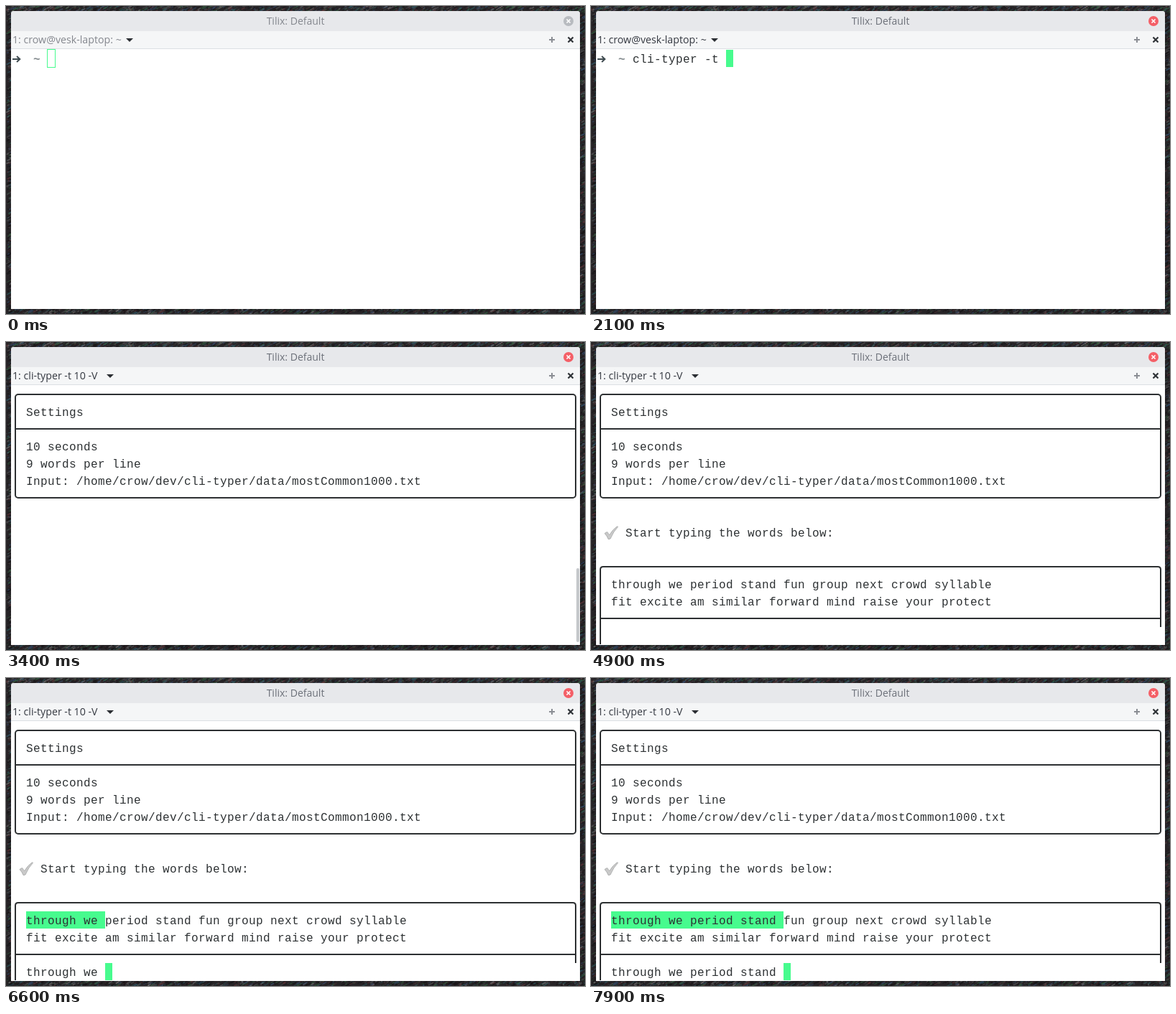
These frames come from a looping animation (806x429 px, 8 s). An HTML page with a canvas:

```html
<!DOCTYPE html>
<html lang="en">
<head>
<meta charset="utf-8">
<title>Terminal typing</title>
<style>
  html, body { margin: 0; width: 100%; height: 100%; overflow: hidden; background: #262326; }
  canvas, svg { position: absolute; left: 0; top: 0; display: block; }
  text { white-space: pre; }
  .mono { font: 16px "Liberation Mono", "DejaVu Sans Mono", monospace; letter-spacing: .4px; fill: #2d3133; }
  .ui { font: 14px "Open Sans", "Noto Sans", sans-serif; }
  .line { fill: none; stroke: #2d3032; stroke-width: 2; }
  .hot { fill: #47fb8e; }
</style>
</head>
<body>
<canvas id="wall" width="806" height="429"></canvas>
<svg width="806" height="429" viewBox="0 0 806 429">
  <path d="M7 422V11q0-4 4-4H795q4 0 4 4V422z" fill="#fff"/>
  <path d="M7 35V11q0-4 4-4H795q4 0 4 4V35z" fill="#e7e8eb"/>
  <rect x="7" y="35" width="792" height="24" fill="#f5f6f7"/>
  <rect x="7" y="59" width="792" height="1" fill="#dcdfe3"/>
  <text id="title" class="ui" x="403" y="26" text-anchor="middle">Tilix: Default</text>
  <circle id="close" cx="783" cy="21" r="7"/>
  <path d="M780.5 18.5l5 5m0-5l-5 5" stroke="#fff" stroke-width="1.7"/>
  <text id="tab" class="ui" x="9" y="52" style="font-size:14.2px"></text>
  <path id="caret" d="M-5 45H5L0 50z" fill="#2b2e33"/>
  <path d="M756 47h8m-4-4v8" stroke="#8b8e94" stroke-width="2"/>
  <path d="M782.5 43.5l7 7m0-7l-7 7" stroke="#2e3236" stroke-width="2.2"/>

  <rect id="mark" class="hot" y="325" height="24"/>
  <rect id="cursor" class="hot" width="10" height="24"/>
  <rect id="hollow" x="57.5" y="60.5" width="11" height="25" fill="none" stroke="#47fb8e"/>

  <g id="shell">
    <path d="M9 74H19M15 70l4.3 4l-4.3 4" fill="none" stroke="#3f4b50" stroke-width="2"/>
    <text class="mono" x="38" y="79" style="fill:#858c8f;font-weight:bold">~</text>
    <text id="cmd" class="mono" x="58" y="79"></text>
  </g>
  <g id="settings">
    <rect class="line" x="13" y="73" width="780" height="144" rx="4"/>
    <path class="line" d="M13 121H793"/>
  </g>
  <path id="check" d="M19 266.5l3.5-2 3.2 4.2q4-7.2 10.8-12l1 .8q-6.300 6.500-10.500 16.500l-2.800 .8q-2-4.800-5.200-8.300z" fill="#c9c9c9" stroke="#a3a5a5" stroke-width=".8"/>
  <text id="start" class="mono" x="48" y="271">Start typing the words below:</text>
  <g id="words">
    <path class="line" d="M13 421V317q0-4 4-4H789q4 0 4 4V397M13 385H793"/>
  </g>
  <text id="input" class="mono" x="28" y="415"></text>
  <rect id="bar" x="794" width="4" rx="2" fill="#c4c7ca"/>
</svg>
<script>
const $ = id => document.getElementById(id);
const LOOP = 8000, ROW = 24, TOP = 61, COL = 10;
const rowY = r => TOP + r * ROW;

const command = "cli-typer -t 10 -V";
const commandKeys = [600, 700, 800, 900, 1000, 1100, 1100, 1200, 1300,
  1500, 1800, 1900, 2100, 2200, 2300, 2500, 2600, 2800];
const typed = "through we period stand ";
const typedKeys = [5400, 5500, 5600, 5700, 5800, 5900, 6000, 6100,
  6300, 6400, 6500, 6700, 6800, 6900, 7000,
  7100, 7200, 7300, 7400, 7500, 7600, 7700, 7800, 7900];
const ENTER = 2900, SETTINGS = 3300, CHECK = 3600, START = 3800,
  WORDS = 4200, READY = 4600, IDLE = 4900, TYPE = 5300;

function addRows(group, rows) {
  for (const [r, s] of rows) {
    const el = document.createElementNS("http://www.w3.org/2000/svg", "text");
    el.setAttribute("class", "mono");
    el.setAttribute("x", 28);
    el.setAttribute("y", rowY(r) + 18);
    el.textContent = s;
    $(group).append(el);
  }
}
addRows("settings", [
  [1, "Settings"],
  [3, "10 seconds"],
  [4, "9 words per line"],
  [5, "Input: /home/crow/dev/cli-typer/data/mostCommon1000.txt"]
]);
addRows("words", [
  [11, "through we period stand fun group next crowd syllable"],
  [12, "fit excite am similar forward mind raise your protect"]
]);

// Dark streaky wallpaper, visible only around the window
function paintWall() {
  const c = $("wall").getContext("2d");
  let seed = 7;
  const rnd = () => (seed = (seed * 16807) % 2147483647) / 2147483647;
  const tones = ["#151315", "#1d1a1c", "#2c2a2c", "#48484a", "#6b6b6c", "#2c5458", "#5c3337", "#33496a", "#34603f"];
  c.fillStyle = "#272427";
  c.fillRect(0, 0, 806, 429);
  for (let i = 0; i < 3600; i++) {
    const flat = rnd() < .64, far = rnd() < .5, d = rnd() * 9;
    const x = flat ? rnd() * 806 : far ? 806 - d : d;
    const y = flat ? (far ? 429 - d : d) : rnd() * 429;
    const bright = flat && !far ? 0 : 3;
    c.save();
    c.translate(x, y);
    c.rotate(-.5);
    c.globalAlpha = .35 + rnd() * .45;
    c.fillStyle = tones[Math.max(0, Math.floor(rnd() * (tones.length + bright)) - bright)];
    c.fillRect(0, 0, 1 + rnd() * 7, 1 + rnd());
    c.restore();
  }
}

const show = (id, on) => $(id).setAttribute("visibility", on ? "visible" : "hidden");
const set = (id, attrs) => { for (const k in attrs) $(id).setAttribute(k, attrs[k]); };
const count = (keys, t) => keys.filter(k => k <= t).length;
const ramp = (t, a, b) => Math.min(1, Math.max(0, (t - a) / (b - a)));
const mix = (a, b, k) => `rgb(${a.map((v, i) => Math.round(v + (b[i] - v) * k))})`;

function setTab(t) {
  const running = t >= ENTER;
  $("tab").textContent = running ? "1: cli-typer -t 10 -V" : "1: crow@vesk-laptop: ~";
  set("caret", { transform: `translate(${running ? 145 : 172} 0)` });
}

function setCursor(t, n, m) {
  const ready = t >= READY && t < IDLE;
  show("cursor", (t >= 200 && t < SETTINGS) || ready || t >= TYPE);
  if (t < ENTER) set("cursor", { x: 58 + n * COL, y: rowY(0) });
  else if (t < SETTINGS) set("cursor", { x: 8, y: rowY(1) });
  else set("cursor", { x: 28 + m * COL, y: rowY(14) });
  show("hollow", t < 200);
}

function setBar(t) {
  const early = t < 1700;
  set("bar", early ? { y: 244, height: 174 } : { y: 315, height: 103 });
  set("bar", {
    opacity: early ? ramp(t, 100, 400) * (1 - ramp(t, 1400, 1600))
      : t >= SETTINGS ? 1 - ramp(t, 4600, IDLE) : 0
  });
}

function draw(time) {
  const t = Math.floor(time / 100) * 100;
  const focus = ramp(t, 0, 400);
  const n = count(commandKeys, t), m = count(typedKeys, t);
  set("close", { fill: mix([184, 187, 192], [244, 95, 103], focus) });
  set("title", { fill: mix([132, 135, 142], [108, 112, 121], focus) });
  set("tab", { fill: mix([132, 135, 142], [52, 56, 64], focus) });
  setTab(t);
  setCursor(t, n, m);
  setBar(t);
  $("cmd").textContent = command.slice(0, n);
  $("input").textContent = typed.slice(0, m);
  set("mark", { x: 28, width: m * COL });
  show("shell", t < SETTINGS);
  show("settings", t >= SETTINGS);
  show("check", t >= CHECK);
  show("start", t >= START);
  show("words", t >= WORDS);
}

paintWall();
const began = performance.now();
function tick() {
  draw((performance.now() - began) % LOOP);
  requestAnimationFrame(tick);
}
tick();
</script>
</body>
</html>
```
